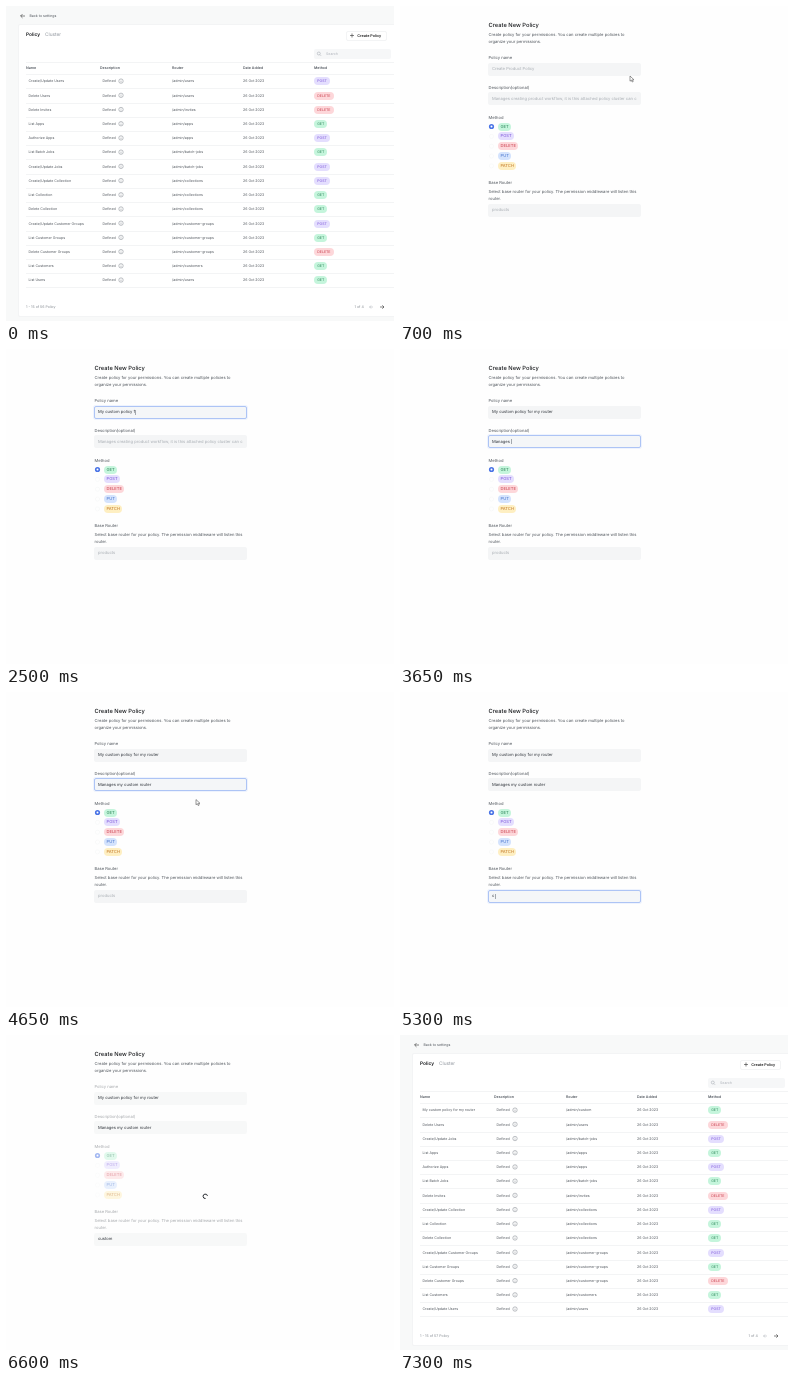
Recreate the animation shown at these times as an HTML page. Size 388x315 px, loop 7600 ms.

```html
<!DOCTYPE html>
<html lang="en">
<head>
<meta charset="utf-8">
<title>Create policy</title>
<style>
html, body { margin: 0; width: 100%; height: 100%; overflow: hidden; }
body { position: relative; background: #f8f9f9; color: #50565d;
  font-family: Inter, "Liberation Sans", sans-serif; text-rendering: geometricPrecision; }
div, span, svg { position: absolute; box-sizing: border-box; }
span { line-height: 6px; white-space: pre; }
.page { left: 0; top: 0; width: 388px; height: 315px; overflow: hidden; }
#list { font-size: 3.57px; }
#form { font-size: 4.13px; background: #fefefe; }
#card { left: 12px; top: 18px; width: 380px; height: 293px; background: #fff; border: 1px solid #f3f4f5; border-radius: 2px; }
.line { left: 20px; width: 368px; height: 1px; background: #f3f4f5; }
.tag { height: 8px; line-height: 8px; border-radius: 4px; padding: 0 2.5px; }
#list .tag { padding: 0 3.2px; }
.GET { background: #c5f5dc; color: #2a8558; }
.POST { background: #e4defe; color: #7850d8; }
.DELETE { background: #fdd7da; color: #c93f4d; }
.PUT { background: #d4e3fd; color: #4270cb; }
.PATCH { background: #feefc2; color: #c0721f; }
.field { left: 88px; width: 153px; height: 13px; background: #f4f5f6; border-radius: 2px; }
.field.on { background: #f4f6f8; border: 1px solid #adc4f5; box-shadow: 0 0 0 1px #eef3fe; }
.clip { left: 92px; width: 146px; height: 8px; overflow: hidden; }
.clip span { top: 1px; color: #30353c; }
.clip .ph { color: #a9aeb4; }
svg { left: 0; top: 0; overflow: visible; }
</style>
</head>
<body>
<div class="page" id="list"></div>
<div class="page" id="form"></div>
<svg width="388" height="315" fill="none">
  <path id="spin" d="M1.5 -1.6A2.2 2.2 0 1 0 1.5 1.6" stroke="#25282d" stroke-width=".9"/>
  <path id="mouse" d="M0 0V5.2L1.3 4.1L2.2 6L3.2 5.5L2.3 3.8H4Z" fill="#fff" stroke="#555" stroke-width=".6"/>
</svg>
<script>
const LOOP = 7600;
const $ = id => document.getElementById(id);
const list = $('list'), form = $('form');

function add(parent, tag, cls, css, text = '') {
  const e = document.createElement(tag);
  e.className = cls;
  e.style.cssText = css;
  e.textContent = text;
  parent.append(e);
  return e;
}
// y is the vertical middle of the line of text
const put = (parent, x, y, text, css = '', cls = '') =>
  add(parent, 'span', cls, `left:${x}px;top:${y - 3}px;${css}`, text);
const tag = (parent, x, y, name) => put(parent, x, y - 1, name, '', 'tag ' + name);

// ---- policy list ----
const nameOf = 'My custom policy for my router';
const users = ['Create/Update Users', 'users', 'POST'];
const invites = ['Delete Invites', 'invites', 'DELETE'];
const jobs = ['Create/Update Jobs', 'batch-jobs', 'POST'];
const before = [
  users, ['Delete Users', 'users', 'DELETE'], invites,
  ['List Apps', 'apps', 'GET'], ['Authorize Apps', 'apps', 'POST'],
  ['List Batch Jobs', 'batch-jobs', 'GET'], jobs,
  ['Create/Update Collection', 'collections', 'POST'],
  ['List Collection', 'collections', 'GET'], ['Delete Collection', 'collections', 'GET'],
  ['Create/Update Customer Groups', 'customer-groups', 'POST'],
  ['List Customer Groups', 'customer-groups', 'GET'],
  ['Delete Customer Groups', 'customer-groups', 'DELETE'],
  ['List Customers', 'customers', 'GET'], ['List Users', 'users', 'GET']
];
const after = [...before];
after[0] = [nameOf, 'custom', 'GET'];
after[2] = jobs;
after[6] = invites;
after[14] = users;

const rowY = i => 75.4 + i * 14.21;
let icons = `<path d="M19 10H14.6M16.5 8.1L14.6 10L16.5 11.9M344 29.5H348M346 27.5V31.5" stroke="#333" stroke-width=".6"/>
  <circle cx="312.8" cy="47.5" r="1.5" stroke="#9ba1a9" stroke-width=".5"/>
  <path d="M314 48.7L315.2 49.9M367 301H363.5M365 299.5L363.5 301L365 302.5" stroke="#a5aab1" stroke-width=".5"/>
  <path d="M374 301H378M376.3 299.3L378 301L376.3 302.7" stroke="#333" stroke-width=".6"/>`;

add(list, 'div', '', '').id = 'card';
put(list, 23.5, 10, 'Back to settings');
put(list, 20, 28.5, 'Policy', 'font-size:4.8px;font-weight:600;color:#17191c');
put(list, 39, 28.5, 'Cluster', 'font-size:4.8px;color:#8d939b');
add(list, 'div', '', 'left:340px;top:25px;width:41px;height:10px;border:1px solid #f3f4f5;border-radius:2px');
put(list, 351.3, 29.5, 'Create Policy', 'font-size:3.75px;font-weight:600;color:#222');
add(list, 'div', '', 'left:308px;top:42.5px;width:77px;height:10.5px;background:#f6f7f8;border-radius:2px');
put(list, 320, 47.5, 'Search', 'color:#adb2b9');
[[20, 'Name'], [94, 'Description'], [166, 'Router'], [237, 'Date Added'], [308, 'Method']]
  .forEach(([x, text]) => put(list, x, 62.2, text, 'font-weight:600;color:#50565e'));
add(list, 'div', 'line', 'top:56px');
before.forEach((_, i) => {
  const y = rowY(i);
  add(list, 'div', 'line', `top:${y - 7.2}px`);
  put(list, 96.5, y, 'Defined');
  put(list, 237, y, '26 Oct 2023');
  icons += `<g stroke="#7d838b" stroke-width=".5"><circle cx="115" cy="${y - .3}" r="2.2"/><path d="M115 ${y - .4}v1.3M115 ${y - 1.5}v.5"/></g>`;
});
add(list, 'div', 'line', `top:${rowY(15) - 7.2}px`);
put(list, 348.5, 301, '1 of 4', 'color:#82888f');

function fill(rows, count) {
  const box = add(list, 'div', 'page', '');
  rows.forEach(([name, path, method], i) => {
    put(box, 22.5, rowY(i), name);
    put(box, 166, rowY(i), '/admin/' + path);
    tag(box, 308, rowY(i), method);
  });
  put(box, 20, 301, `1 - 15 of ${count} Policy`, 'color:#82888f');
  return box;
}
const oldRows = fill(before, 56), newRows = fill(after, 57);
const draw = (parent, body) =>
  parent.insertAdjacentHTML('beforeend', `<svg width="388" height="315" fill="none">${body}</svg>`);
draw(list, icons);

// ---- form ----
put(form, 88.5, 20, 'Create New Policy', 'font-size:5.75px;font-weight:500;color:#17191c');
put(form, 88.5, 28.7, 'Create policy for your permissions. You can create multiple policies to');
put(form, 88.5, 35.7, 'organize your permissions.');

const fields = [
  [63, nameOf, 'Create Product Policy'],
  [92.5, 'Manages my custom router', 'Manages creating product workflow, it is this attached policy cluster can c'],
  [204, 'custom', 'products']
].map(([y, full, hint]) => {
  const box = add(form, 'div', 'field', `top:${Math.floor(y - 6)}px`);
  const clip = add(form, 'div', 'clip', `top:${y - 4}px`);
  const text = add(clip, 'span', '', '');
  const caret = add(clip, 'div', '', 'top:1.6px;width:1px;height:5px;background:#a3a8ae');
  return { box, text, caret, full, hint };
});

const dim = add(form, 'div', 'page', '');
[[51.8, 'Policy name'], [82, 'Description(optional)'], [111.5, 'Method'], [176.6, 'Base Router'],
 [185.7, 'Select base router for your policy. The permission middleware will listen this'],
 [192.6, 'router.']].forEach(([y, text]) => put(dim, 88.5, y, text));
let radios = '<circle cx="91.5" cy="120.5" r="1.8" fill="#fff" stroke="#4a74e6" stroke-width="1.6"/>';
['GET', 'POST', 'DELETE', 'PUT', 'PATCH'].forEach((m, i) => {
  const y = 120.5 + i * 9.85;
  tag(dim, 98, y, m);
  if (i) radios += `<circle cx="91.5" cy="${y}" r="2.1" stroke="#f3f4f5" stroke-width=".5"/>`;
});
draw(dim, radios);

// ---- motion ----
const part = (t, a, b) => Math.min(1, Math.max(0, (t - a) / (b - a)));
const steps = (t, a, b, n) => Math.floor(part(t, a, b) * n + 1e-6);
const within = (t, a, b) => t >= a && t < b;
const show = (e, on) => { e.style.visibility = on ? 'visible' : 'hidden'; };

// each leg: start, end, from x, from y, to x, to y
const legs = [
  [500, 700, 358, 31, 230, 70],
  [700, 950, 230, 70, 196, 62],
  [2980, 3150, 196, 66, 190, 90],
  [4600, 4950, 190, 92, 190, 201]
];

function render(t) {
  const done = t >= 6650;
  show(oldRows, !done);
  show(newRows, done);
  form.style.opacity = part(t, 450, 600) * (1 - part(t, 6650, 6800));
  dim.style.opacity = 1 - .5 * part(t, 6200, 6400);

  const typed = [
    t < 2450 ? steps(t, 1600, 2350, 17) : 18 + steps(t, 2500, 3000, 12),
    steps(t, 3250, 4450, 24),
    t < 5250 ? 0 : 1 + steps(t, 5350, 5600, 5)
  ];
  const focus = [[950, 3150], [3150, 4950], [4950, 5900]].findIndex(([a, b]) => within(t, a, b));
  const blink = within(t, 1450, 1650) || within(t, 4500, 4950) || within(t, 5650, 5900);
  fields.forEach((f, i) => {
    const n = typed[i];
    f.text.textContent = n ? f.full.slice(0, n) : f.hint;
    f.text.className = n ? '' : 'ph';
    f.box.classList.toggle('on', focus === i);
    f.box.style.opacity = 1 - .4 * part(t, 6200, 6400);
    f.caret.style.left = (n ? f.text.getBoundingClientRect().width + .2 : 0) + 'px';
    f.caret.style.display = focus === i && !blink ? '' : 'none';
  });

  const leg = legs.find(([a, b]) => within(t, a, b));
  show($('mouse'), leg);
  if (leg) {
    const [a, b, x, y, u, v] = leg, k = part(t, a, b);
    $('mouse').setAttribute('transform', `translate(${x + (u - x) * k} ${y + (v - y) * k})`);
  }
  show($('spin'), within(t, 6250, 6650));
  $('spin').setAttribute('transform', `translate(199.3 161.3) rotate(${(t - 6500) * .36})`);
}

const start = performance.now();
function tick() {
  const t = (performance.now() - start) % LOOP;
  render(Math.floor(t / 50) * 50);
  requestAnimationFrame(tick);
}
tick();
</script>
</body>
</html>
```
